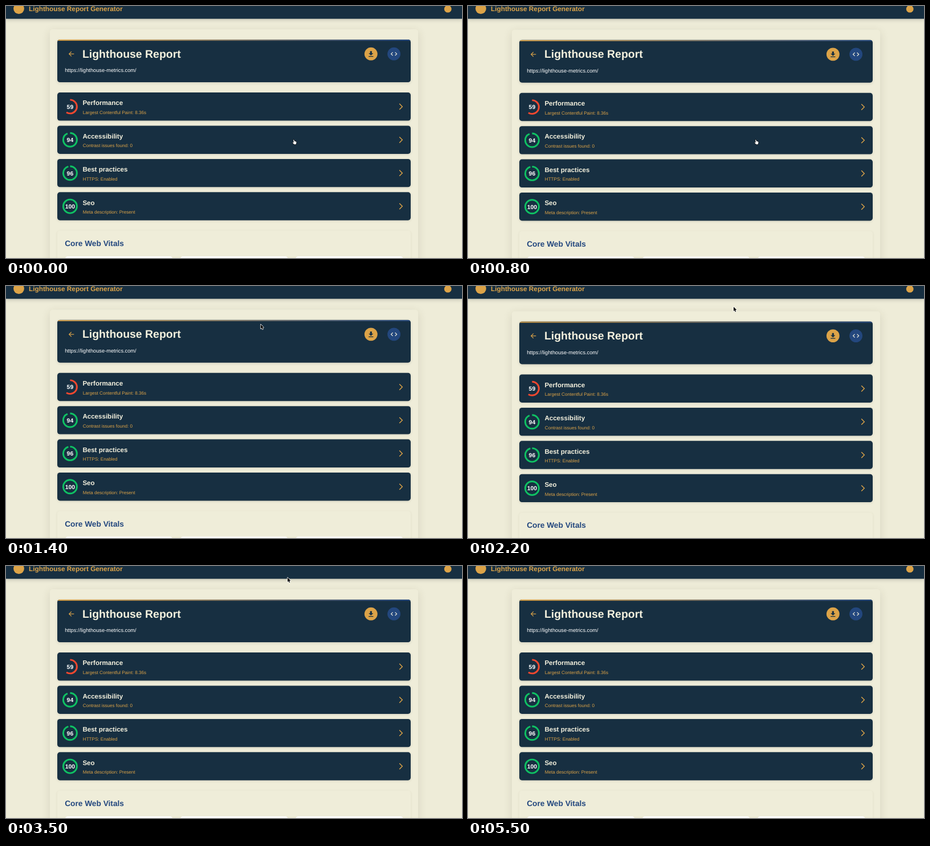
An HTML page with a canvas for the animation above (5.6 s loop, 800x443 px).

```html
<!DOCTYPE html>
<html lang="en">
<head>
<meta charset="utf-8">
<title>Lighthouse Report</title>
<style>
html, body { margin: 0; width: 100%; height: 100%; overflow: hidden; background: #eeecd8; }
canvas { display: block; width: 800px; height: 443px; }
</style>
</head>
<body>
<canvas id="stage"></canvas>
<script>
const LOOP = 5600, W = 800, H = 443;
const NAVY = '#172f41', ORANGE = '#dca348', BLUE = '#23477e', CREAM = '#f4f1de', PAGE = '#eeecd8';
const RED = '#f2482f', GREEN = '#0fc163';
const FONT = '"Liberation Sans", Arial, sans-serif';

const canvas = document.getElementById('stage');
const ctx = canvas.getContext('2d');
const dpr = window.devicePixelRatio || 1;
canvas.width = W * dpr;
canvas.height = H * dpr;

const rows = [
  { score: 59, color: RED, name: 'Performance', note: 'Largest Contentful Paint: 8.36s' },
  { score: 94, color: GREEN, name: 'Accessibility', note: 'Contrast issues found: 0' },
  { score: 96, color: GREEN, name: 'Best practices', note: 'HTTPS: Enabled' },
  { score: 100, color: GREEN, name: 'Seo', note: 'Meta description: Present' }
];

// Each key is [time, ...values]
const bounceKeys = [[0, 0], [100, 0.3], [500, 0.7], [1500, 0.7], [2000, 4.2], [2200, 3.4],
  [2400, 2.3], [2600, 1.5], [2900, 0.8], [3300, 0.1], [3400, 0]];
const pointerKeys = [[0, 506, 239], [900, 506, 239], [1400, 446.8, 67.5], [1900, 466, 36.7],
  [2800, 466, 36.7], [3400, 494, 20.3], [3800, 494, 20.3], [4200, 502, -14]];

const smooth = u => u * u * (3 - 2 * u);

function track(keys, t) {
  const i = keys.findIndex(k => k[0] > t);
  if (i < 0) return keys[keys.length - 1].slice(1);
  const a = keys[i - 1], b = keys[i];
  const u = smooth((t - a[0]) / (b[0] - a[0]));
  return a.slice(1).map((v, j) => v + (b[j + 1] - v) * u);
}

// The picture advances every 100 ms, with two longer pauses
function stepTime(t) {
  const s = Math.floor(t / 100) * 100;
  if (s >= 100 && s < 400) return 100;
  if (s >= 3500 && s < 3800) return 3500;
  return s;
}

function text(str, x, y, size, color, bold, align = 'left') {
  ctx.font = `${bold ? 'bold ' : ''}${size}px ${FONT}`;
  ctx.textAlign = align;
  ctx.fillStyle = color;
  ctx.fillText(str, x, y);
}

function box(x, y, w, h, r, color) {
  ctx.beginPath();
  ctx.roundRect(x, y, w, h, r);
  ctx.fillStyle = color;
  ctx.fill();
}

function disc(x, y, r, color) {
  ctx.beginPath();
  ctx.arc(x, y, r, 0, Math.PI * 2);
  ctx.fillStyle = color;
  ctx.fill();
}

function path(points, closed) {
  ctx.beginPath();
  points.forEach(([x, y]) => ctx.lineTo(x, y));
  if (closed) ctx.closePath();
}

function line(points, color, width) {
  path(points);
  ctx.strokeStyle = color;
  ctx.lineWidth = width;
  ctx.stroke();
}

function withShadow(color, blur, dy, draw) {
  ctx.save();
  ctx.shadowColor = color;
  ctx.shadowBlur = blur * dpr;
  ctx.shadowOffsetY = dy * dpr;
  draw();
  ctx.restore();
}

function drawNav() {
  withShadow('rgba(0,0,0,.16)', 6, 2, () => box(0, -20, W, 42.6, 0, NAVY));
  disc(22.5, 4.6, 9.4, ORANGE);
  text('Lighthouse Report Generator', 40, 9.3, 11.8, ORANGE, true);
  disc(775.2, 5.2, 6.4, ORANGE);
}

function drawTitleCard() {
  withShadow('rgba(0,0,0,.12)', 5, 1.5, () => box(90, 59, 620, 75, 4.6, NAVY));
  ctx.save();
  ctx.beginPath();
  ctx.roundRect(90, 59, 620, 75, 4.6);
  ctx.clip();
  const strip = ctx.createLinearGradient(90, 0, 710, 0);
  strip.addColorStop(0, ORANGE);
  strip.addColorStop(1, BLUE);
  ctx.fillStyle = strip;
  ctx.fillRect(90, 59, 620, 2.1);
  ctx.restore();

  line([[119.3, 84.3], [110.7, 84.3]], ORANGE, 1.2);
  line([[114.8, 80.2], [110.7, 84.3], [114.8, 88.4]], ORANGE, 1.2);
  text('Lighthouse Report', 133.9, 90.7, 19.45, CREAM, true);
  text('https://lighthouse-metrics.com/', 103.2, 116.2, 9.26, '#ffffff');

  disc(640.3, 84.2, 11.4, ORANGE);
  box(638.7, 79.3, 3.2, 4.2, 0, NAVY);
  path([[636.2, 83], [644.4, 83], [640.3, 87]], true);
  ctx.fillStyle = NAVY;
  ctx.fill();
  box(636.2, 88, 8.2, 1.3, 0, NAVY);

  disc(680.6, 84.2, 11.4, BLUE);
  for (const d of [-1, 1]) {
    const x = 680.6 + d * 2;
    line([[x, 81.3], [x + d * 3, 84.2], [x, 87.1]], CREAM, 1.15);
  }
}

function drawRow({ score, color, name, note }, i) {
  const y = 152.1 + i * 58.4, mid = y + 24.8;
  withShadow('rgba(0,0,0,.12)', 4, 1, () => box(90, y, 620, 49.4, 4.6, NAVY));
  ctx.beginPath();
  ctx.arc(112.4, mid, 12, -Math.PI / 2, -Math.PI / 2 + Math.PI * 2 * score / 100);
  ctx.strokeStyle = color;
  ctx.lineWidth = 2.9;
  ctx.stroke();
  text(score, 112.4, mid + 3.8, 10.4, '#ffffff', true, 'center');
  text(name, 134.4, y + 22.2, 11.57, CREAM, true);
  text(note, 134.8, y + 37.8, 8.1, ORANGE);
  line([[690.2, mid - 5.1], [695.3, mid], [690.2, mid + 5.1]], ORANGE, 1.4);
}

function drawVitals() {
  withShadow('rgba(80,70,30,.09)', 4, 1, () => box(90, 395, 620, 100, 4.6, '#efedd9'));
  text('Core Web Vitals', 103.2, 421.9, 13.7, BLUE, true);
  for (let i = 0; i < 3; i++) {
    withShadow('rgba(0,0,0,.05)', 3, 0.5, () => box(103.7 + i * 202.2, 439.9, 188.6, 60, 4.6, '#ffffff'));
  }
}

function drawPage(dy) {
  ctx.save();
  ctx.translate(0, dy);
  withShadow('rgba(60,55,30,.13)', 16, 4, () => box(77, 41, 646, 480, 4.6, '#efedd9'));
  drawTitleCard();
  rows.forEach(drawRow);
  drawVitals();
  ctx.restore();
}

function drawArrow(x, y) {
  ctx.save();
  ctx.translate(x, y);
  path([[0, 0], [0, 7.6], [1.7, 6.1], [2.9, 8.9], [4.2, 8.3], [3, 5.6], [5.3, 5.4]], true);
  ctx.lineJoin = 'round';
  ctx.lineWidth = 1.3;
  ctx.strokeStyle = '#ffffff';
  ctx.stroke();
  ctx.fillStyle = '#000000';
  ctx.fill();
  ctx.restore();
}

function drawHand(x, y) {
  ctx.save();
  ctx.translate(x, y);
  path([[-1.9, -4], [-0.8, -3.8], [0, -1.5], [2.6, -0.8], [3.6, 0.2], [3.1, 3], [2.5, 4.3],
    [-0.6, 4.3], [-3, 1.4], [-2.7, 0.6], [-1.2, 1.2]], true);
  ctx.lineJoin = 'round';
  ctx.lineWidth = 1.2;
  ctx.strokeStyle = '#000000';
  ctx.stroke();
  ctx.fillStyle = '#ffffff';
  ctx.fill();
  ctx.restore();
}

function overRow(y) {
  const d = y - 152;
  return d >= 0 && d % 58.4 < 49.4;
}

function draw(t) {
  ctx.setTransform(dpr, 0, 0, dpr, 0, 0);
  ctx.textRendering = 'geometricPrecision';
  ctx.fillStyle = PAGE;
  ctx.fillRect(0, 0, W, H);
  drawPage(track(bounceKeys, t)[0]);
  drawNav();
  const [x, y] = track(pointerKeys, t);
  (overRow(y) ? drawHand : drawArrow)(x, y);
}

function tick() {
  draw(stepTime(performance.now() % LOOP));
  requestAnimationFrame(tick);
}
tick();
</script>
</body>
</html>
```
